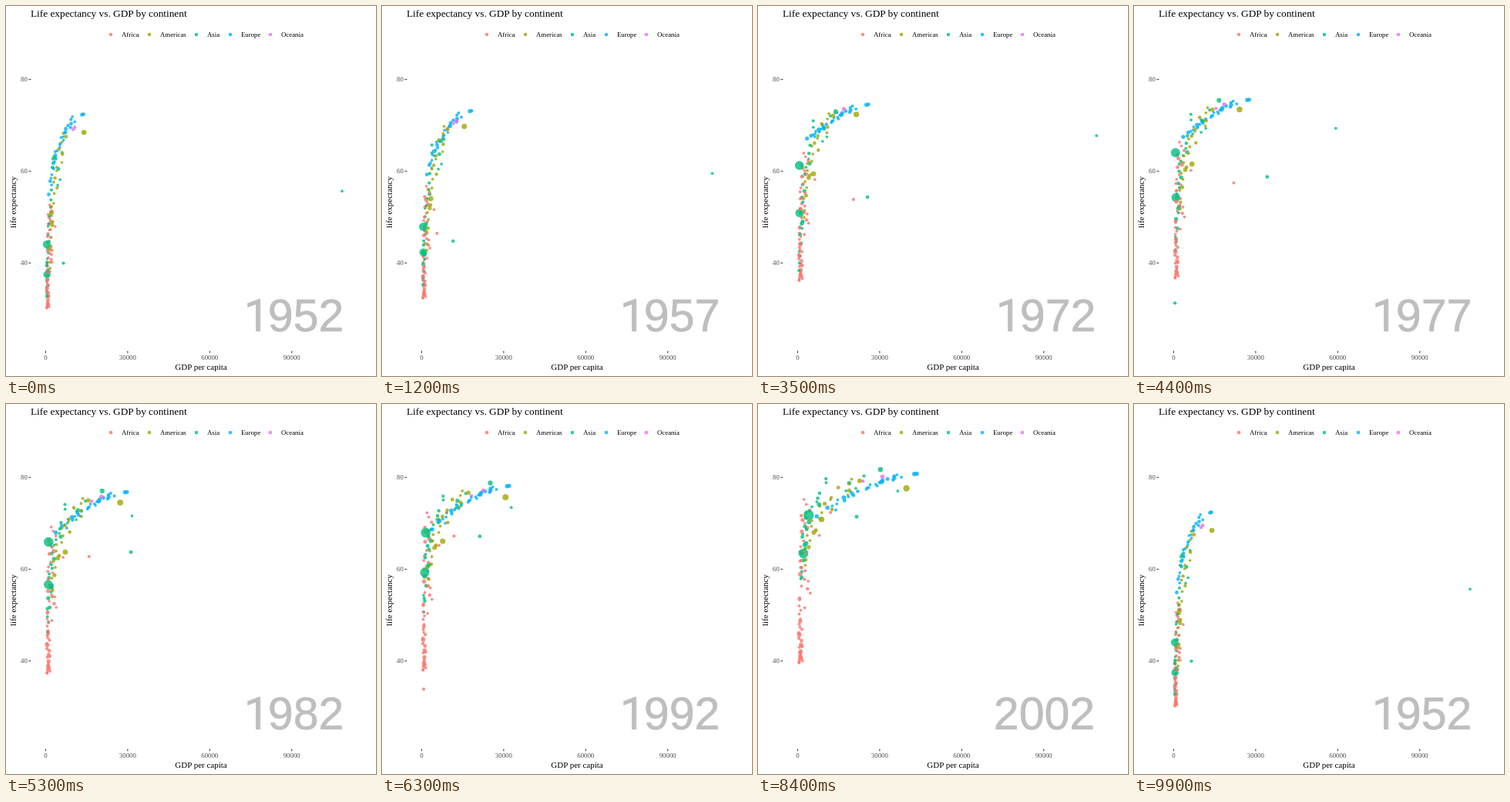
An HTML page for the animation above (10 s loop, 480 by 480 pixels).

```html
<!DOCTYPE html>
<html lang="en">
<head>
<meta charset="utf-8">
<title>Life expectancy vs. GDP by continent</title>
<style>
  html, body { margin: 0; width: 100%; height: 100%; overflow: hidden; background: #fff; }
  svg { display: block; width: 480px; height: 480px; font-family: "Liberation Serif", Times, serif; }
  .title { font-size: 13.3px; }
  .axis { font-size: 11px; text-anchor: middle; }
  .small { font-size: 8.8px; }
  .tick { fill: #4d4d4d; }
  .mid { text-anchor: middle; }
  .end { text-anchor: end; }
  line { stroke: #333; stroke-width: 1.07; }
  circle { fill-opacity: .8; }
  #year { font: 59px "Liberation Sans", Arial, sans-serif; text-anchor: middle;
          fill: #bebebe; stroke: #bebebe; stroke-width: .7; }
  .plain-one { font-family: Roboto, sans-serif; }
</style>
</head>
<body>
<svg viewBox="0 0 480 480">
  <text class="title" x="32" y="14">Life expectancy vs. GDP by continent</text>
  <text class="axis" x="253" y="472">GDP per capita</text>
  <text class="axis" transform="translate(13 254.5) rotate(-90)">life expectancy</text>
  <g id="guides"></g>
  <g id="dots"></g>
  <text id="year" x="371.5" y="422.3"><tspan id="lead"></tspan><tspan id="rest"></tspan></text>
</svg>
<script>
// Steps are five years long and start in 1952. GDP is in hundreds.
// Spread of a continent: [step, life low, median, high, GDP low, median, high].
// tie: how closely a country's GDP rank follows its life expectancy rank.
const continents = {
  Africa: { color: "#f8766d", at: 136, count: 50, tie: .45, spread: [
    [0, 30, 38.8, 52.7, 3, 10, 47], [4, 36, 47, 64, 4, 14, 90],
    [8, 38, 52, 73.6, 4, 11.6, 100], [11, 40, 52.9, 76, 3.5, 14.5, 132]] },
  Americas: { color: "#a3a500", at: 186, count: 23, tie: .8, spread: [
    [0, 37.6, 54.7, 68.8, 14, 30, 114], [4, 48, 63.4, 72.9, 16.5, 53, 190],
    [8, 55, 69.9, 78, 14.6, 66, 263], [11, 61, 72.9, 80.7, 12, 90, 363]] },
  Asia: { color: "#00bf7d", at: 247, count: 27, tie: .75, spread: [
    [0, 32.5, 46, 65.4, 3.3, 12, 99], [4, 39, 57, 73, 3.6, 25, 185],
    [8, 49, 68.5, 77.6, 3.5, 36, 250], [11, 59.5, 72.2, 82.2, 9.4, 45, 470]] },
  Europe: { color: "#00b0f6", at: 291, count: 30, tie: .85, spread: [
    [0, 54, 65.9, 72.7, 10, 51, 147], [4, 67, 70.9, 74.7, 29, 123, 270],
    [8, 68, 75.5, 78.8, 25, 176, 340], [11, 71.8, 78.6, 81.8, 59, 280, 494]] },
  Oceania: { color: "#e76bf3", at: 343, count: 2, tie: 1, spread: [
    [0, 69, 69.2, 69.5, 100, 103, 106], [8, 76.3, 77, 77.6, 183, 209, 234],
    [11, 80.2, 80.7, 81.2, 252, 298, 344]] }
};

// Countries that stand out, as key points: [step, life, GDP]
const notable = [
  { home: "Africa", pop: 6, path: [[0, 42.7, 24], [2, 47.8, 68], [3, 50.2, 188], [5, 57.4, 220], [7, 66.2, 118], [11, 74, 121]] },
  { home: "Africa", pop: 9, path: [[0, 40, 5], [6, 46.2, 9], [7, 44, 8], [8, 23.6, 7], [9, 36, 6], [11, 46.2, 9]] },
  { home: "Americas", pop: 190, path: [[0, 50.9, 21], [5, 61.5, 67], [11, 72.4, 91]] },
  { home: "Americas", pop: 301, path: [[0, 68.4, 140], [2, 70.2, 162], [5, 73.4, 241], [8, 76.1, 320], [11, 78.2, 430]] },
  { home: "Asia", pop: 14, path: [[0, 39.4, 4], [3, 45.4, 5], [5, 31.2, 5], [6, 51, 6], [11, 59.7, 17]] },
  { home: "Asia", pop: 1319, path: [[0, 44, 4], [1, 50.5, 6], [2, 44.5, 5], [3, 58.4, 6], [5, 64, 7], [8, 68.7, 17], [11, 73, 50]] },
  { home: "Asia", pop: 1110, path: [[0, 37.4, 5], [5, 54.2, 8], [8, 60.2, 12], [11, 64.7, 25]] },
  { home: "Asia", pop: 127, path: [[0, 63, 32], [5, 75.4, 166], [8, 79.4, 268], [11, 82.6, 317]] },
  { home: "Asia", pop: 27, path: [[0, 39.9, 65], [3, 49.9, 169], [5, 58.7, 342], [6, 63, 337], [7, 66.3, 212], [11, 72.8, 217]] },
  { home: "Asia", pop: 2, path: [[0, 55.6, 1084], [1, 58, 1135], [3, 64.6, 809], [4, 67.7, 1093], [5, 69.3, 593], [6, 71.3, 314], [10, 76.9, 351], [11, 77.6, 473]] }
];

const guides = document.getElementById("guides");
const dotLayer = document.getElementById("dots");
const lead = document.getElementById("lead");
const rest = document.getElementById("rest");

function add(parent, tag, attrs, text = "") {
  const el = document.createElementNS("http://www.w3.org/2000/svg", tag);
  for (const key in attrs) el.setAttribute(key, attrs[key]);
  el.textContent = text;
  return parent.appendChild(el);
}

let seed = 1952;
function random() {
  seed = (seed * 1664525 + 1013904223) % 4294967296;
  return seed / 4294967296;
}

const xOf = gdp => 51.4 + gdp * .3548;
const yOf = life => 214 - (life - 60) * 5.95;

for (const gdp of [0, 30000, 60000, 90000]) {
  const x = xOf(gdp / 100);
  add(guides, "line", { x1: x, x2: x, y1: 447.5, y2: 450.3 });
  add(guides, "text", { x, y: 459, class: "small tick mid" }, gdp);
}
for (const life of [40, 60, 80]) {
  const y = yOf(life);
  add(guides, "line", { x1: 29.5, x2: 32.3, y1: y + .3, y2: y + .3 });
  add(guides, "text", { x: 27.8, y: y + 3, class: "small tick end" }, life);
}
for (const [name, { color, at }] of Object.entries(continents)) {
  add(guides, "circle", { cx: at, cy: 37, r: 2.3, fill: color });
  add(guides, "text", { x: at + 14, y: 40, class: "small" }, name);
}

// Values between key points [position, ...values]
function between(points, pos) {
  let i = 0;
  while (i < points.length - 2 && pos >= points[i + 1][0]) i++;
  const [from, ...a] = points[i];
  const [to, ...b] = points[i + 1];
  return a.map((v, k) => v + (b[k] - v) * (pos - from) / (to - from));
}

// The last step of the cycle leads back to the first values
const closed = points => [...points, [12, ...points[0].slice(1)]];

function quantile(low, median, high, rank) {
  const power = Math.log((median - low) / (high - low)) / Math.log(.5);
  return low + (high - low) * rank ** power;
}

function spreadPlace(spread, rank, wealth) {
  return step => {
    const [l0, l1, l2, ...gdp] = between(spread, step);
    return [quantile(l0, l1, l2, rank), Math.exp(quantile(...gdp.map(Math.log), wealth))];
  };
}

const dots = notable.map(({ home, pop, path }) => {
  const points = closed(path);
  return { color: continents[home].color, pop, place: step => between(points, step) };
});
for (const { color, count, tie, spread } of Object.values(continents)) {
  const points = closed(spread);
  for (let i = 0; i < count; i++) {
    const rank = (i + random()) / count;
    const wealth = tie * rank + (1 - tie) * random();
    dots.push({ color, pop: 1 + 80 * random() ** 4, place: spreadPlace(points, rank, wealth) });
  }
}
for (const dot of dots) dot.depth = random();
dots.sort((a, b) => a.depth - b.depth);
for (const dot of dots) dot.el = add(dotLayer, "circle", { fill: dot.color });

// [frame, step]: the first transitions take nine frames, later ones about eight
const pace = [[0, 0], [8, 1], [44, 5], [59, 7], [99, 12]];

function draw(frame) {
  const [step] = between(pace, frame);
  const grown = step <= 11 ? step / 11 : 12 - step;
  for (const { el, pop, place } of dots) {
    const [life, gdp] = place(step);
    el.setAttribute("cx", xOf(gdp).toFixed(2));
    el.setAttribute("cy", yOf(life).toFixed(2));
    el.setAttribute("r", (1.75 + 5.2 * Math.sqrt(pop * (.4 + .6 * grown) / 1319)).toFixed(2));
  }
  showYear(String(1952 + 5 * (Math.round(step) % 12)));
}

// A leading 1 is set without a foot
function showYear(year) {
  const one = year[0] === "1";
  lead.textContent = year[0];
  rest.textContent = year.slice(1);
  lead.setAttribute("class", one ? "plain-one" : "");
  lead.setAttribute("dx", one ? 2 : 0);
  rest.setAttribute("dx", one ? -2 : 0);
}

const start = performance.now();
let shown = -1;
function tick() {
  const frame = Math.floor((performance.now() - start) / 100) % 100;
  if (frame !== shown) draw(shown = frame);
  requestAnimationFrame(tick);
}
tick();
</script>
</body>
</html>
```
